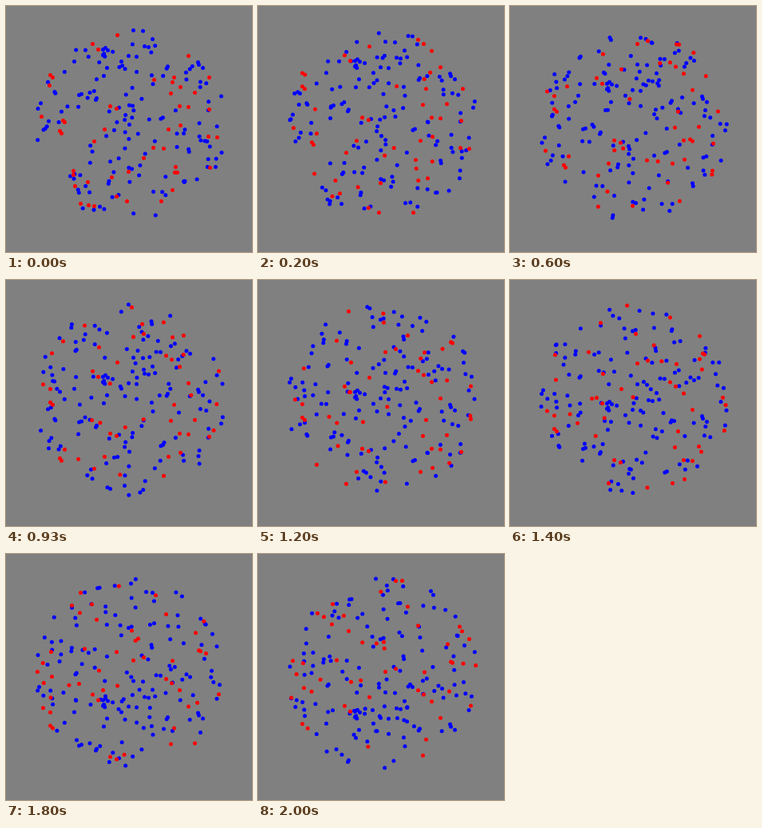
Animation, 308 px wide and 308 px high, one loop 2070 ms. Source, as an HTML page with a canvas:

```html
<!DOCTYPE html>
<html>
<head>
<meta charset="utf-8">
<style>
html, body { margin: 0; height: 100%; overflow: hidden; background: #808080; }
canvas { display: block; }
</style>
</head>
<body>
<canvas id="stage" width="308" height="308"></canvas>
<script>
const ctx = document.getElementById('stage').getContext('2d');
const CX = 155, CY = 149, R = 120, STEP = 4.76, FRAMES = 31, LOOP = 2070;
const RED = '#f00', BLUE = '#00f', DOWN = 90;
const dots = [];

let seed = 20;
function random() {
  seed = (seed * 16807) % 2147483647;
  return seed / 2147483647;
}

// Split the start into distance along the heading and sideways offset.
function addDot(color, x, y, heading = DOWN) {
  const a = heading * Math.PI / 180, ux = Math.cos(a), uy = Math.sin(a);
  const dx = x - CX, dy = y - CY;
  const side = dy * ux - dx * uy;
  const half = Math.sqrt(Math.max(1, R * R - side * side));
  dots.push({ color, ux, uy, side, half, along: dx * ux + dy * uy });
}

function addRandom(heading) {
  const r = R * Math.sqrt(random()), a = 2 * Math.PI * random();
  addDot(BLUE, CX + r * Math.cos(a), CY + r * Math.sin(a), heading);
}

const blueFalling = [
  [121, 54], [124, 52], [127, 55], [113, 115], [112, 117], [240, 70],
  [241, 73], [246, 77], [126, 77], [85, 69], [153, 62], [163, 63],
  [173, 50], [178, 51], [183, 41], [159, 30], [122, 87]
];
const redFalling = [
  [139, 36], [108, 47], [115, 54], [228, 62], [55, 86], [58, 89], [210, 89],
  [206, 109], [236, 108], [130, 125], [138, 128], [217, 125], [228, 126],
  [254, 129], [44, 138], [73, 145], [67, 156], [69, 159], [123, 154],
  [110, 169], [203, 154], [218, 149], [253, 163], [264, 164], [197, 178],
  [102, 220], [93, 247], [103, 249], [110, 250], [153, 207], [151, 244],
  [138, 238], [194, 244], [212, 201], [255, 202]
];
// x, y, heading in degrees
const redStray = [
  [254, 89, 82], [71, 143, 270], [184, 177, 179], [172, 190, 193],
  [84, 206, 166], [84, 211, 29], [208, 95, -60], [86, 225, 63],
  [132, 214, 121], [211, 208, 201], [208, 230, 237], [214, 208, -75],
  [185, 92, 146], [218, 101, 224], [54, 99, -72.5]
];

for (let i = 0; i < 88; i++) addRandom(DOWN);
for (let i = 0; i < 45; i++) addRandom(360 * random());
for (const p of blueFalling) addDot(BLUE, ...p);
for (const p of [...redFalling, ...redStray]) addDot(RED, ...p);

// A dot that leaves the disc comes back at the opposite point of the rim.
function drawDot({ color, ux, uy, side, half, along }, travel) {
  const pos = along + travel;
  const wraps = Math.floor((pos + half) / (2 * half));
  const a = pos - 2 * half * wraps;
  const s = wraps % 2 ? -side : side;
  ctx.fillStyle = color;
  ctx.beginPath();
  ctx.arc(CX + a * ux - s * uy, CY + a * uy + s * ux, 2.5, 0, 2 * Math.PI);
  ctx.fill();
}

function draw() {
  const t = performance.now() % LOOP;
  const frame = Math.min(FRAMES - 1, Math.floor((t + 4) * 15 / 1000));
  ctx.setTransform(1, 0, 0, 1, 0, 0);
  ctx.fillStyle = '#808080';
  ctx.fillRect(0, 0, 308, 308);
  ctx.translate(0.5, 0.5);
  for (const dot of dots) drawDot(dot, frame * STEP);
  requestAnimationFrame(draw);
}
draw();
</script>
</body>
</html>
```
